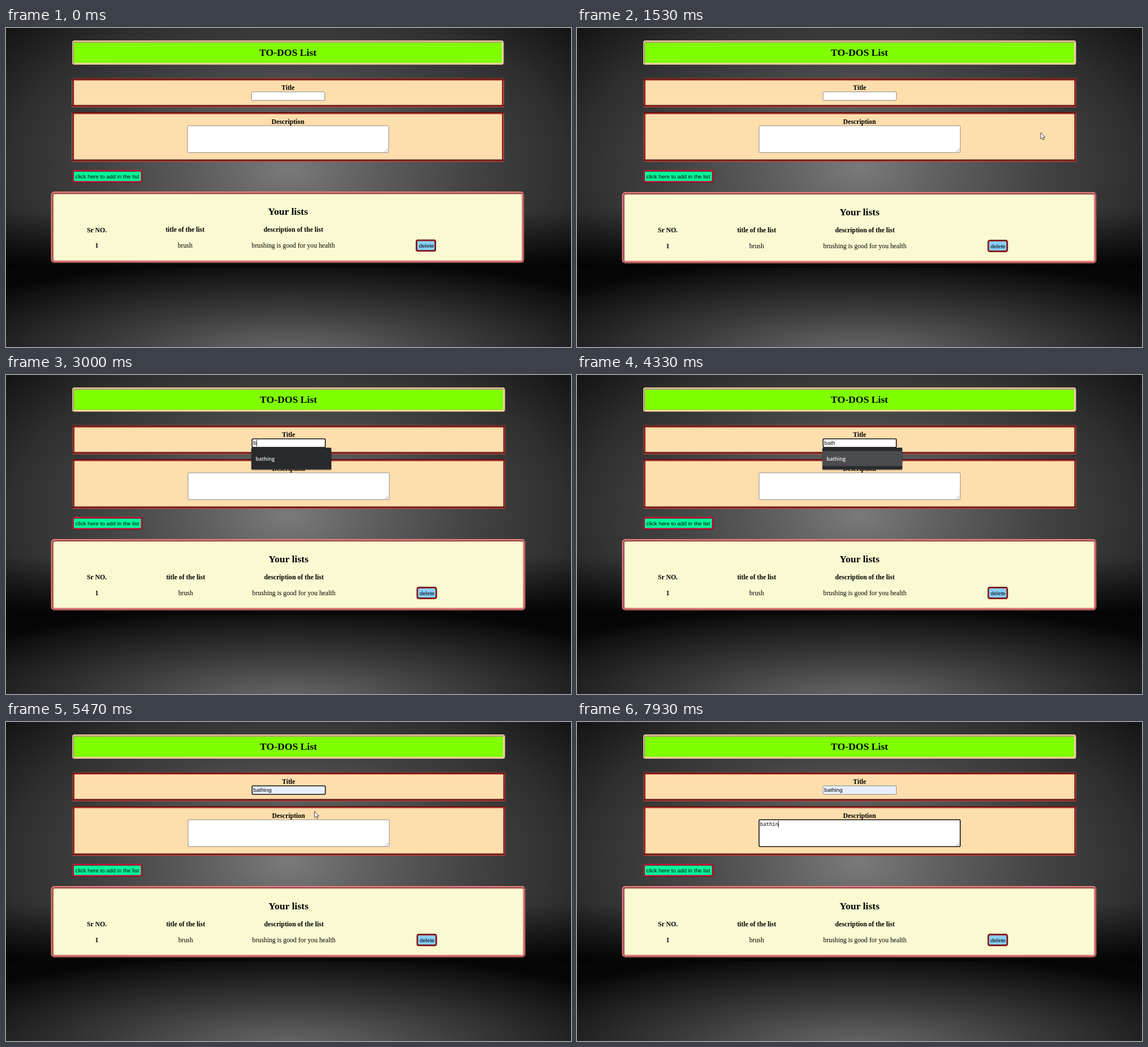
An HTML page that plays this animation: 997x562 px, repeating every 8 s.

```html
<!DOCTYPE html>
<html lang="en">
<head>
<meta charset="utf-8">
<title>TO-DOS List</title>
<style>
  html, body { margin: 0; width: 100%; height: 100%; overflow: hidden; background: #000; }
  #stage {
    --d: 0px;
    position: relative; width: 997px; height: 562px; overflow: hidden;
    background:
      radial-gradient(ellipse 690px 165px at 498px 150px, #676767, #565656 20%, #3c3c3c 45%, #262626 68%, #111 90%, #060606) 0 422px / 997px 140px no-repeat,
      linear-gradient(#0000 320px, #00000070 370px, #000000e8 422px),
      radial-gradient(ellipse 660px 390px at 498px 248px, #7a7a7a, #5c5c5c 25%, #424242 50%, #2e2e2e 75%, #121212);
  }
  /* Boxes are laid out on a 1360px wide page, shown scaled down */
  #page { position: absolute; width: 1360px; height: 767px; transform: scale(.733); transform-origin: 0 0; }
  #page div { position: absolute; box-sizing: border-box; }
  .head { left: 158.5px; top: 30px; width: calc(1043px - 2.7 * var(--d)); height: 59px; border: 5px ridge #ffdead; border-radius: 6px; background: #7fff00; }
  .field { left: calc(160px - var(--d)); width: calc(1041.5px - 1.7 * var(--d)); border: 5px groove #ac1e1e; background: #ffdead; }
  .add { left: 158.5px; top: 341px; width: 170px; height: 31px; border: 4px ridge #dc143c; border-radius: 6px; background: #00fa9a; }
  .panel { left: 108px; top: calc(394px - var(--d)); width: calc(1143px - 2.7 * var(--d)); height: 172px; border: 6px ridge #e87c7c; border-radius: 9px; background: #fafad2; }
  .del { left: calc(987.5px - 1.4 * var(--d)); top: calc(509px - 1.4 * var(--d)); width: 50px; height: 30px; border: 4px groove #ac1e1e; border-radius: 6px; background: #87cefa; }
  svg { position: absolute; left: 0; top: 0; }
  text { white-space: pre; }
  .mid { transform: translate(calc(-1 * var(--d)), 0); }
  .low { transform: translate(calc(-1 * var(--d)), calc(-1 * var(--d))); }
  .down { transform: translate(0, calc(-.6 * var(--d))); }
  .serif { font: 11.73px "Liberation Serif", serif; text-anchor: middle; }
  .bold { font-weight: bold; }
  .big { font-size: 17.6px; }
  .sans { font: 9.78px "Liberation Sans", sans-serif; }
  .mono { font: 9px "Noto Sans Mono", monospace; }
  .menu { font: 600 9px "Open Sans", sans-serif; fill: #f2f2f2; }
  #popup rect { filter: drop-shadow(0 1px 1px #0006); }
</style>
</head>
<body>
<div id="stage">
  <div id="page">
    <div class="head"></div>
    <div class="field" style="top:120.5px;height:69px"></div>
    <div class="field" style="top:202px;height:118.5px"></div>
    <div class="add"></div>
    <div class="panel"></div>
    <div class="del"></div>
  </div>
  <svg width="997" height="562">
    <g class="mid">
      <g class="serif bold">
        <text class="big" x="498.5" y="49">TO-DOS List</text>
        <text x="498.7" y="109">Title</text>
        <text x="498.5" y="168.7">Description</text>
      </g>
      <rect id="titleBox" x="434.3" y="112.5" width="129.2" height="15" rx="1.5"/>
      <text id="titleText" class="sans" x="436.6" y="123.2"></text>
      <rect id="noteBox" x="321.3" y="172.2" width="355" height="47.3" rx="1.5"/>
      <path d="M669 218.5l6-6M673 218.5l2-2" stroke="#777" stroke-width=".8"/>
      <text id="noteText" class="mono" x="323" y="183"></text>
    </g>
    <text class="sans" x="122.3" y="264.8">click here to add in the list</text>
    <g class="low">
      <g class="serif bold">
        <text class="big" x="498.5" y="329.5">Your lists</text>
        <text x="317" y="360.3">title of the list</text>
        <text x="508" y="360.3">description of the list</text>
      </g>
      <g class="serif">
        <text x="317" y="387.7">brush</text>
        <text x="508" y="387.7">brushing is good for you health</text>
      </g>
      <text class="sans" x="743" y="387.5" text-anchor="middle">delete</text>
    </g>
    <g class="serif bold down">
      <text x="160.3" y="360.3">Sr NO.</text>
      <text x="160.3" y="387.5">1</text>
    </g>
    <rect id="caret" width=".8" height="12"/>
    <g id="popup">
      <rect id="menuBox" x="433" y="128" width="141" rx="1.5" fill="#292a2d"/>
      <path id="highlight" d="M433 134h141v26.5h-141z" fill="#4b4c4f"/>
      <g id="menuItems" class="menu"></g>
    </g>
    <path id="arrow" d="M.5 .5v11.2l2.6-2.4 1.8 4 1.8-.8-1.8-3.9h3.4z" fill="#fff" stroke="#333" stroke-width=".9"/>
    <path id="beam" d="M-2.5-6h2l.5.5.5-.5h2M0-5.5v11M-2.5 6h2l.5-.5.5.5h2" fill="none" stroke="#222"/>
  </svg>
</div>
<script>
const LOOP = 8000;
const $ = id => document.getElementById(id);
const history = ["enter the title here", "a", "brush", "m", "bathing", "fbadsfsb"];

// Number of times already reached
const reached = (t, times) => times.filter(time => t >= time).length;
const show = (id, on) => $(id).style.display = on ? "" : "none";

// points: [time, x, y]
function along(points, t) {
  let i = 1;
  while (i < points.length - 1 && t > points[i][0]) i++;
  const [a, b] = [points[i - 1], points[i]];
  const k = Math.min(1, Math.max(0, (t - a[0]) / (b[0] - a[0])));
  return [a[1] + (b[1] - a[1]) * k, a[2] + (b[2] - a[2]) * k];
}

function paintBox(id, focused, fill) {
  const box = $(id);
  box.setAttribute("fill", fill);
  box.setAttribute("stroke", focused ? "#101010" : "#767676");
  box.setAttribute("stroke-width", focused ? 1.6 : .8);
}

function paintPopup(t) {
  const items = t < 2870 ? history : ["bathing"];
  const open = t >= 2270 && t < 4870;
  show("popup", open);
  if (!open) return;
  $("popup").style.opacity = t < 4670 ? 1 : Math.max(0, .7 - (t - 4670) / 150);
  $("menuBox").setAttribute("height", 12 + 26.45 * items.length);
  show("highlight", t >= 4330);
  $("menuItems").innerHTML = items.map((item, i) =>
    `<text x="440.6" y="${150.8 + 26.45 * i}">${item}</text>`).join("");
}

function paintCaret(t, inNote) {
  const edits = [2200, 2870, 3070, 3400, 4670, 5870, 6670, 6800, 6930, 7130, 7330, 7730];
  const last = edits[reached(t, edits) - 1];
  const preview = t >= 4330 && t < 4670;
  show("caret", t >= 2270 && !preview && Math.floor((t - last) / 530) % 2 === 0);
  const width = $(inNote ? "noteText" : "titleText").getComputedTextLength();
  $("caret").setAttribute("x", Math.round((inNote ? 323 : 436.6) + width));
  $("caret").setAttribute("y", inNote ? 174 : 114);
}

function paintPointer(t) {
  const step = Math.floor((t + 4) * .015) / .015;
  const first = t < 5000;
  const [x, y] = first
    ? along([[1266, 997, 225], [1533, 818, 184], [1950, 520, 119], [2070, 503, 114]], step)
    : along([[5400, 548, 156], [5467, 544, 157], [5533, 536, 190]], step);
  const visible = t >= 1270 && t < 2270 || t >= 5400 && t < 5870;
  const overInput = first ? x < 563 && y < 127 : y > 172;
  show("arrow", visible && !overInput);
  show("beam", visible && overInput);
  for (const id of ["arrow", "beam"]) $(id).setAttribute("transform", `translate(${x} ${y})`);
}

function paint(t) {
  const inNote = t >= 5870;
  $("stage").style.setProperty("--d", t < 1270 ? "1px" : "0px");
  $("titleText").textContent = t >= 4400 ? "bathing" : ["", "b", "ba", "bath"][reached(t, [2870, 3070, 3400])];
  $("noteText").textContent = "bathin".slice(0, reached(t, [6670, 6800, 6930, 7130, 7330, 7730]));
  paintBox("titleBox", t >= 2270 && !inNote, t >= 4400 ? "#e8f0fe" : "#fff");
  paintBox("noteBox", inNote, "#fff");
  paintPopup(t);
  paintCaret(t, inNote);
  paintPointer(t);
}

const start = performance.now();
function tick() {
  paint((performance.now() - start) % LOOP);
  requestAnimationFrame(tick);
}
tick();
</script>
</body>
</html>
```
